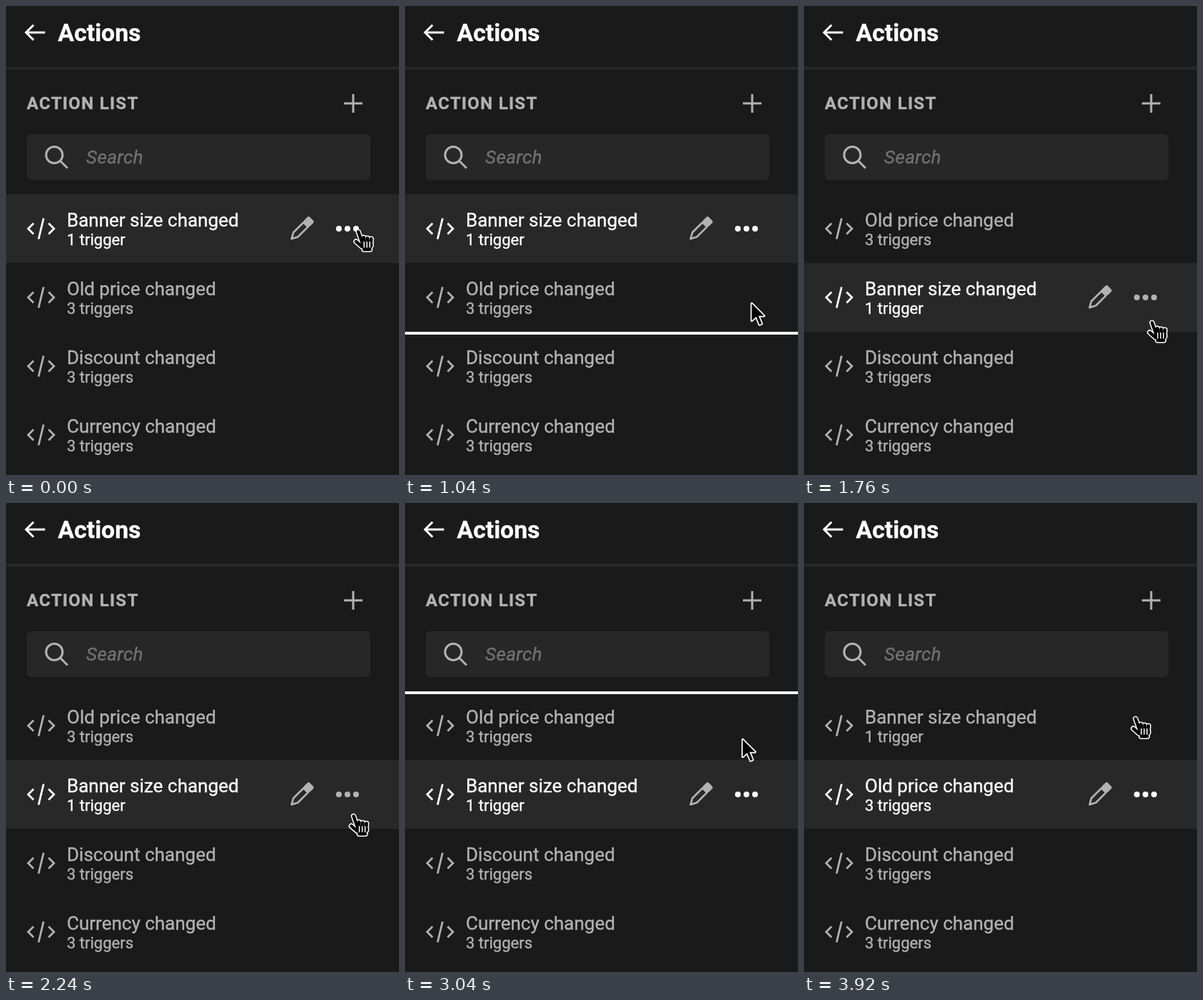
These frames come from a looping animation (549 by 655 pixels, 4 s). An HTML page with a canvas:

```html
<!DOCTYPE html>
<html lang="en">
<head>
<meta charset="utf-8">
<title>Action list</title>
<style>
  html, body { margin: 0; width: 100%; height: 100%; overflow: hidden; background: #1a1a1a; }
  canvas { display: block; }
</style>
</head>
<body>
<canvas id="stage" width="549" height="655"></canvas>
<script>
const ctx = document.getElementById('stage').getContext('2d');
const W = 549, H = 655, LOOP = 4000, STEP = 80;
const ROW_TOP = 263, ROW_H = 96;
const BG = '#1a1a1a', PANEL = '#282828', GREY = '#b2b2b2', WHITE = '#fff';
const FIRST_GRAB = 320, FIRST_DROP = 1760, HOVER = 2400;
const SECOND_GRAB = 2640, SECOND_DROP = 3600;

const banner = ['Banner size changed', '1 trigger'];
const oldPrice = ['Old price changed', '3 triggers'];
const rest = [['Discount changed', '3 triggers'], ['Currency changed', '3 triggers']];

// Pointer travel: drag down, return to the dots, drag up
const home = { x: 493, y: 313 };
const legs = [
  { from: FIRST_GRAB, to: 1360, x: 487, y: 440, bow: -6 },
  { from: 2160, to: 2480, x: 483, y: 407, bow: 0 },
  { from: 2580, to: 3280, x: 464, y: 299, bow: 2 }
];

function pointerAt(t) {
  let { x, y } = home;
  for (const leg of legs) {
    const k = Math.min(1, Math.max(0, (t - leg.from) / (leg.to - leg.from)));
    const e = (1 - Math.cos(Math.PI * k)) / 2;
    x += (leg.x - x) * e + leg.bow * Math.sin(Math.PI * k);
    y += (leg.y - y) * e;
  }
  return { x, y };
}

function text(str, x, y, font, color, spacing = 0) {
  ctx.font = font + ' Roboto, sans-serif';
  ctx.letterSpacing = spacing + 'px';
  ctx.fillStyle = ctx.strokeStyle = color;
  ctx.lineWidth = 0.35;
  ctx.fillText(str, x, y);
  ctx.strokeText(str, x, y);
}

function line(x0, y0, x1, y1, color, width) {
  ctx.strokeStyle = color;
  ctx.lineWidth = width;
  ctx.beginPath();
  ctx.moveTo(x0, y0);
  ctx.lineTo(x1, y1);
  ctx.stroke();
}

// V shape pointing at (x, y); a negative size points right
function chevron(x, y, size, color, width) {
  const h = Math.abs(size);
  ctx.strokeStyle = color;
  ctx.lineWidth = width;
  ctx.beginPath();
  ctx.moveTo(x + size, y - h);
  ctx.lineTo(x, y);
  ctx.lineTo(x + size, y + h);
  ctx.stroke();
}

function disc(x, y, r) {
  ctx.beginPath();
  ctx.arc(x, y, r, 0, Math.PI * 2);
}

function rounded(x, y, w, h, r, color) {
  ctx.fillStyle = color;
  ctx.beginPath();
  ctx.roundRect(x, y, w, h, r);
  ctx.fill();
}

function at(x, y, draw) {
  ctx.save();
  ctx.translate(x, y);
  draw();
  ctx.restore();
}

function drawHeader() {
  ctx.fillStyle = BG;
  ctx.fillRect(0, 0, W, H);
  line(28, 37, 54.5, 37, WHITE, 3);
  chevron(28, 37, 10.5, WHITE, 3);
  text('Actions', 72.5, 48.5, 'bold 33.7px', WHITE);
  ctx.fillStyle = '#272727';
  ctx.fillRect(0, 85, W, 4);
  text('ACTION LIST', 29, 144, 'bold 24px', GREY, 1.3);
  line(472, 136, 498, 136, GREY, 3);
  line(485, 123, 485, 149, GREY, 3);

  rounded(29, 179, 480, 64, 6, '#272727');
  line(76, 216.5, 86, 226.5, GREY, 3);
  disc(67.5, 208, 11.5);
  ctx.stroke();
  text('Search', 112, 220, 'italic 26px', '#727272', 0.4);
}

function drawPencil() {
  const half = 4.4, shoulder = 10, ferrule = 30;
  ctx.rotate(-Math.PI / 4);
  ctx.strokeStyle = GREY;
  ctx.lineWidth = 2.7;
  ctx.lineJoin = 'round';
  ctx.beginPath();
  ctx.moveTo(2, 0);
  ctx.lineTo(shoulder, -half);
  ctx.lineTo(ferrule, -half);
  ctx.lineTo(ferrule, half);
  ctx.lineTo(shoulder, half);
  ctx.closePath();
  ctx.stroke();
  rounded(ferrule, -5.8, 11.5, 11.6, 3, GREY);
}

function drawRow([title, sub], index, active, dotColor) {
  const y = ROW_TOP + index * ROW_H;
  const color = active ? WHITE : GREY;
  if (active) {
    ctx.fillStyle = PANEL;
    ctx.fillRect(0, y, W, ROW_H);
  }
  at(0, y, () => {
    chevron(31, 48, 7.5, color, 2.8);
    line(52.5, 33.5, 45.5, 62.5, color, 2.8);
    chevron(67, 48, -7.5, color, 2.8);
    text(title, 85, 45, '26px', color);
    text(sub, 85, 71, '22px', color);
    if (!active) return;
    at(397.5, 63.5, drawPencil);
    ctx.fillStyle = dotColor;
    for (let i = 0; i < 3; i++) {
      disc(465 + i * 12, 48, 4);
      ctx.fill();
    }
  });
}

const arrow = new Path2D('M1 3V27L7.3 21.5L11.8 32.5L15 31.2L10.4 20.3H18.3Z');

function drawArrow() {
  ctx.lineJoin = 'round';
  ctx.strokeStyle = WHITE;
  ctx.lineWidth = 3.4;
  ctx.stroke(arrow);
  ctx.fillStyle = '#000';
  ctx.fill(arrow);
}

// Round strokes form the hand: a wide white pass, then a black one
function drawHand() {
  ctx.lineCap = 'round';
  for (const [color, rim] of [[WHITE, 3], ['#000', 0]]) {
    line(7.2, 4.2, 12, 18, color, 4.4 + rim);
    line(4, 18, 12, 25, color, 4.4 + rim);
    for (let i = 0; i < 3; i++) line(14.6 + i * 5.2, 12.5 + i, 15 + i * 4.5, 24, color, 5 + rim);
    line(14, 23, 23, 23, color, 9 + rim);
    line(15, 29, 23.5, 29, color, 4.5 + rim);
  }
  for (let i = 0; i < 3; i++) line(15.2 + i * 4, 18.5, 15.2 + i * 4, 26, WHITE, 1.5);
}

function draw(t) {
  const swapped = t >= FIRST_DROP && t < SECOND_DROP;
  const active = t < FIRST_DROP ? 0 : 1;
  const pointer = pointerAt(t);
  const dragging = t >= FIRST_GRAB && t < FIRST_DROP || t >= SECOND_GRAB && t < SECOND_DROP;
  const dotColor = t >= FIRST_DROP && t < HOVER ? GREY : WHITE;
  const rows = (swapped ? [oldPrice, banner] : [banner, oldPrice]).concat(rest);

  drawHeader();
  rows.forEach((row, i) => drawRow(row, i, i === active, dotColor));

  // The drop marker sits on the far edge of the row under the pointer
  const over = Math.floor((pointer.y - ROW_TOP) / ROW_H);
  if (dragging && over !== active) {
    ctx.fillStyle = '#f4f4f4';
    ctx.fillRect(0, ROW_TOP + (over > active ? over + 1 : over) * ROW_H, W, 4);
  }
  if (dragging) at(pointer.x, pointer.y, drawArrow);
  else at(pointer.x - 8, pointer.y - 2, drawHand);
}

const start = performance.now();
function frame() {
  const t = (performance.now() - start) % LOOP;
  draw(Math.floor(t / STEP) * STEP);
  requestAnimationFrame(frame);
}
frame();
</script>
</body>
</html>
```
